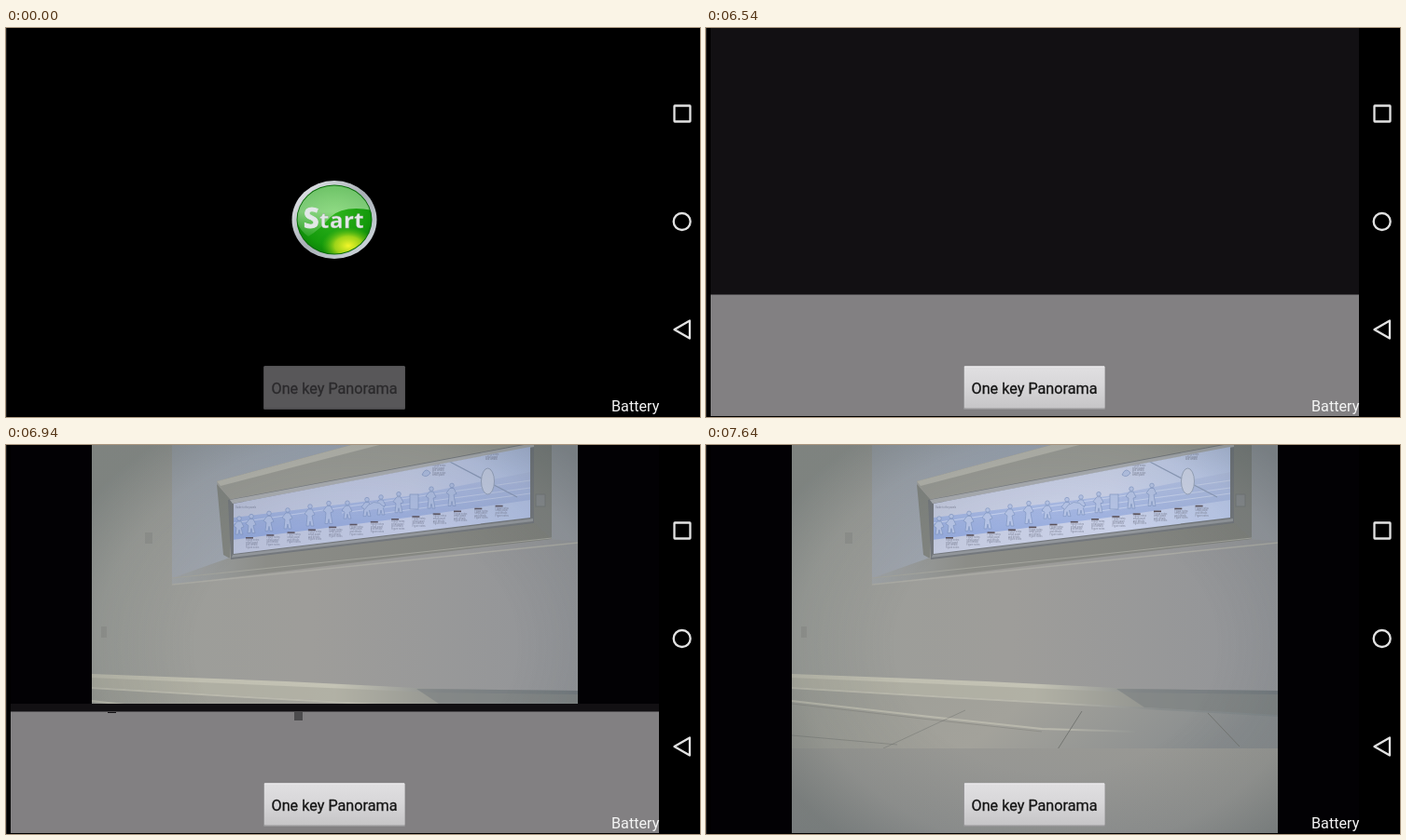
An HTML page that plays this animation: 744x418 px, repeating every 8 s.

```html
<!DOCTYPE html>
<html lang="en">
<head>
<meta charset="utf-8">
<title>One key Panorama</title>
<style>
html, body { margin: 0; width: 100%; height: 100%; overflow: hidden; background: #000; }
svg, .view { position: absolute; left: 0; top: 0; width: 744px; height: 418px; }
text { font-family: Roboto, sans-serif; }
.view, .step { animation: 8s step-end infinite; }
.start { animation-name: start; }
.panel { animation-name: panel; }
.lower { animation-name: lower; }
.upper { animation-name: upper; }
.view { animation-name: reveal; }
.sign-haze { animation-name: signHaze; }
@keyframes start { 0% { opacity: 1 } 6.25%, 100% { opacity: 0 } }
@keyframes panel { 0% { opacity: 0 } 81%, 100% { opacity: 1 } }
@keyframes lower { 0% { opacity: 0 } 81.75%, 100% { opacity: 1 } }
@keyframes upper { 0% { opacity: 0 } 84.125%, 100% { opacity: 1 } }
@keyframes reveal {
  0% { clip-path: inset(0 0 418px 0) }
  85.375% { clip-path: inset(0 0 280px 0) }
  86.25% { clip-path: inset(0 0 210px 0) }
  86.75% { clip-path: inset(0 0 140px 0) }
  90.375% { clip-path: inset(0 0 71px 0) }
  91.625%, 100% { clip-path: inset(0 0 1px 0) }
}
@keyframes signHaze { 0% { opacity: .12 } 95.5%, 100% { opacity: 0 } }
</style>
</head>
<body>
<svg viewBox="0 0 744 418">
  <defs>
    <radialGradient id="green" cx=".5" cy=".42" r=".65">
      <stop offset="0" stop-color="#2fb51d"/><stop offset=".65" stop-color="#159b0c"/><stop offset="1" stop-color="#057404"/>
    </radialGradient>
    <radialGradient id="glow">
      <stop offset="0" stop-color="#f4f62a"/><stop offset=".5" stop-color="#bfe21c" stop-opacity=".8"/><stop offset="1" stop-color="#58bd12" stop-opacity="0"/>
    </radialGradient>
    <linearGradient id="ring" x1="0" y1="0" x2="1" y2="1">
      <stop offset="0" stop-color="#eef0f3"/><stop offset=".5" stop-color="#a9afb6"/><stop offset="1" stop-color="#d6dfe4"/>
    </linearGradient>
    <linearGradient id="shine" x1="0" y1="0" x2="0" y2="1">
      <stop offset="0" stop-color="#fff" stop-opacity=".35"/><stop offset=".55" stop-color="#efffea" stop-opacity=".5"/><stop offset="1" stop-color="#efffea" stop-opacity=".1"/>
    </linearGradient>
    <clipPath id="lens"><ellipse cx="352" cy="206" rx="39.5" ry="36.5"/></clipPath>
  </defs>

  <rect width="744" height="418"/>
  <rect width="1" height="418" fill="#242424"/>

  <g class="step start">
    <ellipse cx="352" cy="206" rx="45.5" ry="42" fill="url(#ring)"/>
    <ellipse cx="352" cy="206" rx="40.5" ry="37.5" fill="#0a6a0a"/>
    <g clip-path="url(#lens)">
      <rect x="310" y="165" width="84" height="82" fill="url(#green)"/>
      <ellipse cx="367" cy="234" rx="29" ry="20" fill="url(#glow)"/>
      <path d="M310 165H394V196Q362 190 348 203Q336 217 324 224Q312 216 310 200Z" fill="url(#shine)"/>
    </g>
    <text x="319" y="215" fill="#e3e8e8" stroke="#8ca08c" stroke-width=".3" font-size="24" font-weight="700" letter-spacing=".5" style="font-family:'Open Sans',sans-serif"><tspan font-size="30" stroke="#e3e8e8" stroke-width="1">S</tspan>tart</text>
  </g>

  <rect class="step panel" x="5" width="695" height="417" fill="#121013"/>
  <rect class="step lower" x="5" y="286.5" width="695" height="130.5" fill="#828082"/>
  <g class="step upper">
    <rect x="5" width="695" height="166" fill="#007f00"/>
    <g id="teeth" fill="#121013"></g>
    <path d="M144 166h8v2h-8zM492 166h8v4h-8z" fill="#007f00"/>
    <rect x="309" y="287" width="9" height="9" fill="#4c4b4d"/>
    <path d="M109 287h9v1h-9z" fill="#121013"/>
  </g>
</svg>

<div class="view">
<svg viewBox="0 0 744 418">
  <defs>
    <linearGradient id="wall">
      <stop offset="0" stop-color="#9c9e99"/><stop offset=".45" stop-color="#9e9d9a"/><stop offset="1" stop-color="#929498"/>
    </linearGradient>
    <linearGradient id="side">
      <stop offset="0" stop-color="#9fa4ab"/><stop offset="1" stop-color="#98a2b1"/>
    </linearGradient>
    <linearGradient id="sill">
      <stop offset="0" stop-color="#9fa3a6"/><stop offset=".25" stop-color="#8c8d88"/><stop offset="1" stop-color="#7e807b"/>
    </linearGradient>
    <linearGradient id="base">
      <stop offset="0" stop-color="#bcbbad"/><stop offset=".5" stop-color="#c4c3b5"/><stop offset=".72" stop-color="#8d908f"/><stop offset="1" stop-color="#727a7e"/>
    </linearGradient>
    <linearGradient id="floor" x1="0" y1="0" x2="1" y2=".15">
      <stop offset="0" stop-color="#9c9d96"/><stop offset=".5" stop-color="#a3a29b"/><stop offset="1" stop-color="#888c8e"/>
    </linearGradient>
    <linearGradient id="edge" gradientUnits="userSpaceOnUse" x1="92" y1="0" x2="613" y2="0">
      <stop offset="0" stop-color="#bbbaad"/><stop offset=".55" stop-color="#b8b7ac"/><stop offset=".75" stop-color="#898d8d"/><stop offset="1" stop-color="#7f8689"/>
    </linearGradient>
    <linearGradient id="near" x1="0" y1="0" x2="0" y2="1">
      <stop offset="0" stop-color="#989894"/><stop offset="1" stop-color="#929392"/>
    </linearGradient>
    <linearGradient id="paper">
      <stop offset="0" stop-color="#c3c9de"/><stop offset=".6" stop-color="#cbd2e9"/><stop offset="1" stop-color="#bccbee"/>
    </linearGradient>
    <linearGradient id="band" x1="0" y1="0" x2="0" y2="1">
      <stop offset="0" stop-color="#b9c6e8"/><stop offset="1" stop-color="#94a9dc"/>
    </linearGradient>
    <radialGradient id="vignette" gradientUnits="userSpaceOnUse" cx="0" cy="0" r="1" gradientTransform="translate(375 215) scale(345 275)">
      <stop offset=".5" stop-color="#3f4b4c" stop-opacity="0"/><stop offset=".8" stop-color="#3f4b4c" stop-opacity=".11"/><stop offset="1.1" stop-color="#3f4b4c" stop-opacity=".32"/>
    </radialGradient>
    <clipPath id="photo"><rect x="92" width="521" height="417"/></clipPath>
    <clipPath id="board"><path d="M244 63L562 2V78L244 117Z"/></clipPath>
  </defs>
  <rect x="5" width="695" height="418" fill="#020104"/>
  <g clip-path="url(#photo)">
    <rect x="92" width="521" height="418" fill="url(#wall)"/>
    <path d="M178 0H370L226 39L240 122L178 150Z" fill="url(#side)"/>
    <path d="M226 39L370 0H560L240 58Z" fill="#999a94"/>
    <path d="M226 39L370 0H400L230 44Z" fill="#b3b3ab"/>
    <path d="M226 42L240 58V122L233 118Z" fill="#81847f"/>
    <path d="M178 143L240 121L566 83H585V101L178 150Z" fill="url(#sill)"/>
    <path d="M566 0H585V101L566 84Z" fill="#7e817e"/>
    <path d="M585 0H613V104L585 101Z" fill="#93979d"/>
    <path d="M178 150L613 105" stroke="#aaaaa4" stroke-width="1.5"/>
    <path d="M178 143L400 120L585 100" fill="none" stroke="#a3a49d"/>
    <rect x="568" y="53" width="10" height="13" fill="#85888b" stroke="#737777"/>
    <g fill="#92938f"><rect x="149" y="94" width="8" height="12"/><rect x="102" y="195" width="6" height="12"/></g>

    <path d="M238 59L566 -3V84L241 123Z" fill="#73777c"/>
    <path d="M240 59L566 -2V2L243 63Z" fill="#a9acb0"/>
    <path d="M242 121L565 82V79L243 118Z" fill="#92969b"/>
    <g clip-path="url(#board)">
      <rect x="240" width="326" height="125" fill="url(#paper)"/>
      <path d="M243 78L430 55L562 29V59L430 78L243 102Z" fill="url(#band)"/>
      <path d="M243 84L562 38M360 73L562 46M400 74L562 52" stroke="#d0daf1" stroke-width=".8"/>
      <path d="M472 16L548 56" stroke="#8e9dbb" stroke-width="1.2"/>
      <g id="figures" fill="#b6c4e6" stroke="#7b90bd" stroke-width=".6"></g>
      <ellipse cx="516.5" cy="39" rx="7" ry="14" fill="#cfd6ea" stroke="#99a6bd"/>
      <g id="labels" fill="#81869a" font-size="2.6"></g>
      <rect class="step sign-haze" x="240" width="326" height="125" fill="#6f7fa8"/>
    </g>

    <path d="M92 246L300 254L460 262L613 264V330H92Z" fill="url(#base)"/>
    <path d="M92 250L300 259L460 266L613 268V330H92Z" fill="#a09f96" opacity=".5"/>
    <path d="M92 260L260 270L420 279L613 291V326H92Z" fill="url(#floor)"/>
    <path d="M440 262L613 264V291L470 282Z" fill="#747b7f" opacity=".5"/>
    <path d="M92 261L260 271L420 280L613 291" fill="none" stroke="url(#edge)" stroke-width="2"/>
    <path d="M92 275L240 292L360 305L460 308" fill="none" stroke="url(#edge)" stroke-width="2"/>
    <path d="M92 278L240 295L360 308" fill="none" stroke="#8c8c86" stroke-width=".8"/>
    <g fill="none" stroke="#747672"><path d="M403 286L377 327"/><path d="M538 288L572 324"/><path d="M278 285L190 326" opacity=".5"/><path d="M92 312L205 322" opacity=".5"/></g>
    <rect x="92" y="326" width="521" height="92" fill="url(#near)"/>
    <rect x="92" width="521" height="418" fill="url(#vignette)"/>
  </g>
</svg>
</div>

<svg viewBox="0 0 744 418">
  <defs>
    <linearGradient id="key" x1="0" y1="0" x2="0" y2="1">
      <stop offset="0" stop-color="#e0dfe1"/><stop offset=".45" stop-color="#d8d7d9"/><stop offset="1" stop-color="#c6c5c7"/>
    </linearGradient>
  </defs>
  <rect x="276" y="363" width="152" height="47" rx="1.5" fill="#979698"/>
  <rect x="277" y="363.5" width="150.5" height="45" rx="1" fill="url(#key)"/>
  <path d="M277 364H427" stroke="#efeef0"/>
  <text x="352" y="392.5" font-size="16.2" text-anchor="middle" fill="#151515" stroke="#151515" stroke-width=".3">One key Panorama</text>
  <g class="step start">
    <rect x="275" y="362" width="154" height="49"/>
    <rect x="276" y="363" width="152" height="47" rx="1.5" fill="#4b4a4c"/>
    <rect x="277" y="363.5" width="150.5" height="45" rx="1" fill="#585759"/>
    <text x="352" y="392.5" font-size="16.2" text-anchor="middle" fill="#2b2a2c" stroke="#2b2a2c" stroke-width=".3">One key Panorama</text>
  </g>
  <text x="649" y="412" font-size="16.2" fill="#f4f4f4">Battery</text>
  <g fill="none" stroke="#e2e2e2" stroke-width="2.3">
    <rect x="716.5" y="83.5" width="17" height="17" rx=".5"/>
    <circle cx="724.7" cy="208" r="9"/>
    <path d="M716.5 324L733 314.5V333.5Z" stroke-linejoin="round"/>
  </g>
</svg>

<script>
const svgNS = 'http://www.w3.org/2000/svg';
function add(parent, tag, attrs, text = '') {
  const el = document.createElementNS(svgNS, tag);
  for (const name in attrs) el.setAttribute(name, attrs[name]);
  el.textContent = text;
  document.getElementById(parent).append(el);
}

// Ragged lower edge of the green field
const missing = [15, 17, 28, 30, 34];
for (let i = 0; i < 40; i++) {
  if (missing.includes(i)) continue;
  add('teeth', 'rect', { x: 14 + i * 17.37, y: 156, width: 8.5, height: 10 });
}
add('teeth', 'path', { d: 'M266 156h5v10h-5zM275 156h1v10h-1zM309 156h2v10h-2zM314 156h1v10h-1zM318 156h1v10h-1zM485 157h6v9h-6zM519 166l4-5 5 1 1-5 4 2 3-2 2 4 4-2v7zM605 162h8v4h-8z' });

// Illustrated figures and captions on the sign
const people = [250, 263, 282, 302, 326, 346, 366, 387, 402, 421, 456, 478];
people.forEach((x, i) => {
  const y = 88 - (x - 250) * .145;
  const h = 18 + (i * 7) % 6;
  add('figures', 'circle', { cx: x, cy: y - h / 2, r: 2.3 });
  add('figures', 'path', {
    d: `M${x - 2} ${y - h / 2 + 3}h4l3 6l-3 1l2 ${h - 11}h-3l-1 -5l-1 5h-3l1 -${h - 11}l-3 -2z`
  });
});
add('figures', 'rect', { x: 433, y: 53, width: 9, height: 16 });
add('figures', 'path', { d: 'M383 71q11 -17 23 -4M446 32q4 -9 9 -2q-4 6 -9 2' });

function caption(x, y, lines) {
  add('labels', 'rect', { x, y: y - 4, width: 8, height: 1.6, fill: '#5a5058' });
  for (let i = 0; i < lines; i++) {
    add('labels', 'text', { x, y: y + i * 2.6 }, ['Figure notes', 'small panel', 'and details'][i % 3]);
  }
}
for (let i = 0; i < 13; i++) caption(257 + i * 22.3, 103 - i * 2.85, 4);
caption(457, 23, 5);
caption(514, 11, 3);
add('labels', 'text', { x: 246, y: 68 }, 'Guide to the panels');
</script>
</body>
</html>
```
